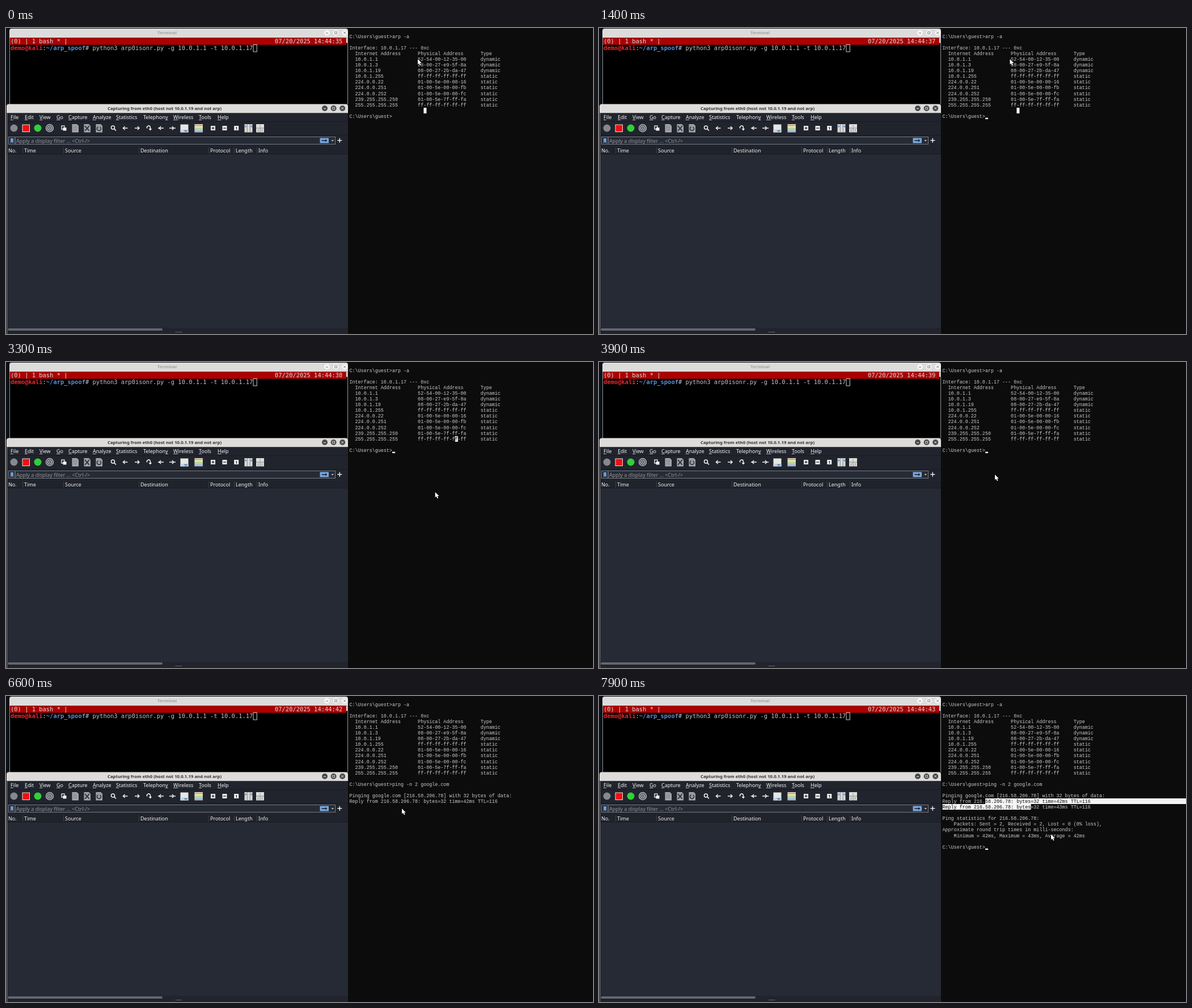
Animation, 1035 px wide and 541 px high, one loop 8000 ms. Source, as an HTML page with a canvas:

```html
<!DOCTYPE html>
<html lang="en">
<head>
<meta charset="utf-8">
<title>Desktop capture</title>
<style>
html, body { margin: 0; width: 100%; height: 100%; overflow: hidden; background: #0c0c0c; }
canvas { display: block; }
</style>
</head>
<body>
<canvas id="stage" width="1035" height="541"></canvas>
<script>
const W = 1035, H = 541, LOOP = 8000, STEP = 100;
const g = document.getElementById('stage').getContext('2d');
const UI = '9.1px "Noto Sans", sans-serif';
const LABEL = '500 9px "Noto Sans", sans-serif';
const TITLE = 'bold 7.75px "Noto Sans", sans-serif';
const TERM = '10.44px "DejaVu Sans Mono", monospace';
const CMD = '8.39px "Liberation Mono", monospace';

function box(x, y, w, h, color) {
  g.fillStyle = color;
  g.fillRect(x, y, w, h);
}
function frame(x, y, w, h, color, lw = 1) {
  g.strokeStyle = color;
  g.lineWidth = lw;
  g.strokeRect(x, y, w, h);
}
function disc(x, y, r, color) {
  g.fillStyle = color;
  g.beginPath();
  g.arc(x, y, r, 0, 7);
  g.fill();
}
function ring(x, y, r, color, lw, from = 0, to = 7) {
  g.strokeStyle = color;
  g.lineWidth = lw;
  g.beginPath();
  g.arc(x, y, r, from, to);
  g.stroke();
}
function line(color, lw, ...p) {
  g.strokeStyle = color;
  g.lineWidth = lw;
  g.beginPath();
  for (let i = 0; i < p.length; i += 2) g.lineTo(p[i], p[i + 1]);
  g.stroke();
}
function poly(color, ...p) {
  g.fillStyle = color;
  g.beginPath();
  for (let i = 0; i < p.length; i += 2) g.lineTo(p[i], p[i + 1]);
  g.fill();
}
function text(s, x, y, font, color) {
  g.font = font;
  g.fillStyle = color;
  g.fillText(s, x, y);
}
function titleBar(x, y, w, h, color) {
  g.fillStyle = color;
  g.beginPath();
  g.roundRect(x, y, w, h, [4, 4, 0, 0]);
  g.fill();
}
function windowButtons(x, y, fill, ink) {
  for (let i = 0; i < 3; i++) disc(x + i * 15.6, y, 5, fill);
  line(ink, 1, x - 2, y + .5, x + 2, y + .5);
  frame(x + 13.8, y - 1.8, 3.6, 3.6, ink, .9);
  const c = x + 31.2;
  line(ink, 1, c - 1.8, y - 1.8, c + 1.8, y + 1.8);
  line(ink, 1, c - 1.8, y + 1.8, c + 1.8, y - 1.8);
}

// Terminal window
const EDGE = '#8f949a';

function drawTerminal(seconds) {
  box(0, 0, 603, 135, '#0b1016');
  titleBar(6, 1, 597, 17, '#dedcda');
  text('Terminal', 267, 11, TITLE, '#a3a19f');
  windowButtons(566, 8.5, '#f6f5f4', '#77767b');
  box(6, 17.4, 597, 117.6, EDGE);
  box(7, 17.4, 595, 117.6, '#000');
  box(7, 17.4, 593, 12.3, '#ad0000');
  box(600, 17.4, 2, 9, '#e4e4e4');
  text('(0) | 1 bash * |', 8, 27.2, TERM, '#dcdcdc');
  text('07/20/2025 14:44:' + seconds, 474, 27.2, TERM, '#dcdcdc');
  let x = 8;
  const put = (s, color, bold) => {
    text(s, x, 39.2, (bold ? 'bold ' : '') + TERM, color);
    x += g.measureText(s).width;
  };
  put('demo@kali', '#f0282e', true);
  put(':', '#d0d0d0');
  put('~/arp_spoof', '#5b8fd6', true);
  put('# python3 arp0isonr.py -g 10.0.1.1 -t 10.0.1.17', '#c4c4c4');
  frame(436, 29.5, 6.3, 12.5, '#d0d0d0');
}

// Toolbar icons, all centred on one row
const ROW = 177, INK = '#f2f2f2', BLUE = '#5d93cf';

function page(x) {
  poly('#a6a9ae', x - 5.5, ROW - 7, x + 3, ROW - 7, x + 6, ROW - 4, x + 6, ROW + 7.5, x - 5.5, ROW + 7.5);
  for (let y = -4; y <= 5; y += 2.5) line('#6d7179', .8, x - 4, ROW + y, x + 4, ROW + y);
}
function arrow(x, dir) {
  line(INK, 1.5, x - 4 * dir, ROW, x + 4 * dir, ROW);
  line(INK, 1.5, x + .8 * dir, ROW - 3, x + 4 * dir, ROW, x + .8 * dir, ROW + 3);
}
function badge(x, sign) {
  box(x - 4, ROW - 4, 8, 8, INK);
  if (sign === '1') text('1', x - 1.9, ROW + 2.8, 'bold 7px "Noto Sans", sans-serif', '#20232b');
  else line('#20232b', 1.3, x - 2.5, ROW, x + 2.5, ROW);
  if (sign === '+') line('#20232b', 1.3, x, ROW - 2.5, x, ROW + 2.5);
}
function drawToolbar() {
  disc(14, ROW, 6.5, '#85888d');
  box(28.5, 170.5, 13.5, 13.5, '#f5d8d8');
  box(29.5, 171.5, 11.5, 11.5, '#ee1111');
  disc(56, ROW, 6.5, '#2fd03a');

  disc(77, ROW, 7.2, '#b4b7bb');
  for (const r of [2, 5]) ring(77, ROW, r, '#3b3f49', 1.3);

  frame(98, 173, 5, 6, INK, 1.3);
  box(100.5, 176, 6, 5.5, INK);
  page(122);
  page(143);
  line('#23262f', 1.5, 139, 173, 147, 182);
  line('#23262f', 1.5, 147, 173, 139, 182);
  page(164);
  ring(164, 178, 3.6, '#23262f', 1.4, -1, 4.2);

  ring(188.5, 176, 3, INK, 1.5);
  line(INK, 1.7, 190.6, 178.2, 194, 181.5);
  arrow(210.5, -1);
  arrow(231, 1);
  ring(251.5, 176, 3, INK, 1.5, Math.PI * .85, Math.PI * 2);
  line(INK, 1.5, 254.5, 176, 254.5, 180);
  poly(INK, 251.5, 178, 257.2, 178, 254.5, 181.5);
  arrow(274, -1);
  disc(269, ROW, 1, INK);
  arrow(292, 1);
  disc(298, ROW, 1, INK);

  box(307.5, 170.5, 14, 14, '#e6e6e3');
  box(307.5, 180, 14, 4.5, '#cdd2d8');
  poly(BLUE, 313, 180.5, 321, 180.5, 317, 184.5);
  box(332.5, 170, 14.5, 14.5, '#eceae0');
  ['#d9534f', '#dfd05a', '#7dbf5d', '#5d93cf', '#9a6fb8'].forEach((c, i) => box(332.5, 171.5 + i * 2.8, 14.5, 1.2, c));
  badge(365, '+');
  badge(385.5, '-');
  badge(406.2, '1');
  box(420.5, 170, 14, 14.5, '#d9d9d6');
  line('#6c7078', .8, 425.3, 170, 425.3, 184.5);
  line('#6c7078', .8, 430.2, 170, 430.2, 184.5);
  poly(BLUE, 421.5, 172, 425, 174, 421.5, 176);
  poly(BLUE, 434, 172, 430.5, 174, 434, 176);
  box(441, 170, 14, 14.5, '#dededb');
  line('#6c7078', .8, 441, ROW, 455, ROW);
  line('#6c7078', .8, 448, ROW, 448, 184.5);
  const tiny = '5px "Noto Sans", sans-serif';
  text('1', 446.6, 175.5, tiny, '#555');
  text('2', 443, 183, tiny, '#555');
  text('3', 450, 183, tiny, '#555');
}

// Packet capture window
const MENU = [['File', 8], ['Edit', 33], ['View', 59], ['Go', 89], ['Capture', 110], ['Analyze', 153],
  ['Statistics', 194], ['Telephony', 242, 8], ['Wireless', 295], ['Tools', 340], ['Help', 373]];
const COLUMNS = [['No.', 4], ['Time', 32], ['Source', 104], ['Destination', 237],
  ['Protocol', 360], ['Length', 405], ['Info', 445]];

function drawCapture() {
  titleBar(1, 134.5, 602, 20, '#dedcda');
  text('Capturing from eth0 (host not 10.0.1.19 and not arp)', 179, 144.7, TITLE, '#303030');
  windowButtons(562, 142, '#4b4b4b', '#e4e4e4');
  box(0, 150.5, 603, 390.5, '#0b1016');
  box(1, 150.5, 1, 390.5, EDGE);
  box(2, 150.5, 601, 390.5, '#21242d');

  for (const [name, x, key = 0] of MENU) {
    text(name, x, 160.6, LABEL, '#f5f5f5');
    const left = x + g.measureText(name.slice(0, key)).width;
    box(left, 162, g.measureText(name[key]).width, .8, '#e0e0e0');
  }
  box(2, 165, 601, 1, '#191b22');
  drawToolbar();
  box(2, 189.5, 601, 1, '#191b22');

  box(5, 193, 575, 12.5, '#272b35');
  frame(4.5, 192.5, 576, 13, '#777b84');
  poly('#6b9bd2', 8, 195, 13, 195, 13, 204, 10.5, 201.5, 8, 204);
  box(15.5, 193.5, 1, 11.5, '#9a9da4');
  text('Apply a display filter ... <Ctrl-/>', 18, 202.6, UI, '#92959c');
  box(553.5, 194.5, 15.5, 9, '#79a8de');
  line('#1d2330', 1.6, 556.5, 199, 564, 199);
  poly('#1d2330', 563, 196.5, 566.5, 199, 563, 201.5);
  poly('#c8c8c8', 573.5, 198, 578, 198, 575.8, 200.5);
  line(INK, 1.4, 584.3, 198.7, 592.3, 198.7);
  line(INK, 1.4, 588.3, 194.7, 588.3, 202.7);

  box(2, 210, 601, 13, '#20232b');
  for (const [name, x] of COLUMNS) {
    text(name, x, 219.6, LABEL, '#f2f2f2');
    if (x > 4) box(x - 3, 211, 1, 11.5, '#3a3e48');
  }
  box(2, 223, 601, 307.5, '#262a34');
  box(2, 222.5, 601, .8, '#171920');
  box(2, 530.5, 601, 10.5, '#21242d');
  g.fillStyle = '#64676e';
  g.beginPath();
  g.roundRect(3, 531, 273, 4, 2);
  g.fill();
  for (let i = 0; i < 6; i++) box(299 + i * 2, 537, 1, 1, '#a0a3a8');
}

// Command prompt on the right
const CW = 5.035, RH = 10.08, X0 = 605.5, Y0 = 9.9;
const colX = c => X0 + c * CW;
const rowY = r => Y0 + r * RH;
const PROMPT = 'C:\\Users\\guest>';
const HOST = '216.58.206.78';
const ARP = `10.0.1.1 52-54-00-12-35-00 dynamic
10.0.1.3 08-00-27-e9-5f-8a dynamic
10.0.1.19 08-00-27-2b-da-47 dynamic
10.0.1.255 ff-ff-ff-ff-ff-ff static
224.0.0.22 01-00-5e-00-00-16 static
224.0.0.251 01-00-5e-00-00-fb static
224.0.0.252 01-00-5e-00-00-fc static
239.255.255.250 01-00-5e-7f-ff-fa static
255.255.255.255 ff-ff-ff-ff-ff-ff static`.split('\n').map(s => {
  const [ip, mac, kind] = s.split(' ');
  return '  ' + ip.padEnd(22) + mac.padEnd(22) + kind;
});

function cmdLines(t) {
  const out = [PROMPT + 'arp -a', '', 'Interface: 10.0.1.17 --- 0xc',
    '  Internet Address      Physical Address      Type', ...ARP, '',
    PROMPT + (t >= 5000 ? 'ping -n 2 google.com' : '')];
  if (t >= 5700) out.push('', `Pinging google.com [${HOST}] with 32 bytes of data:`);
  if (t >= 5800) out.push(`Reply from ${HOST}: bytes=32 time=42ms TTL=116`);
  if (t >= 6900) out.push(`Reply from ${HOST}: bytes=32 time=43ms TTL=116`, '',
    `Ping statistics for ${HOST}:`,
    '    Packets: Sent = 2, Received = 2, Lost = 0 (0% loss),',
    'Approximate round trip times in milli-seconds:',
    '    Minimum = 42ms, Maximum = 43ms, Average = 42ms', '', PROMPT);
  return out;
}

// Spans of selected cells: [row, first column, end column]
function selection(t, m) {
  const col = Math.floor((m.x - X0) / CW) + 1;
  if (t < 1500) return [[13, 26, 27]];
  if (t < 3100) return [[4, 23, t < 2100 ? Math.max(24, col) : 43]];
  if (t < 3900) return [[12, 37, 38]];
  if (t < 7300) return [];
  if (t >= 7600) return [[17, 15, 90], [18, 0, 31]];
  return m.y < rowY(18) ? [[17, 15, Math.max(16, col)]] : [[17, 15, 90], [18, 0, col]];
}

// Caret toggles at each of these times
const BLINKS = [100, 600, 1200, 2300, 2700, 3400, 3900, 4400, 4900, 5500, 5900, 6500, 6900];
const caretOn = t => BLINKS.filter(b => b <= t).length % 2 === 1;

function drawLines(lines, color) {
  lines.forEach((s, r) => text(s, X0, rowY(r) + 7.8, CMD, color));
}
function drawCmd(t, m) {
  box(603, 0, W - 603, H, '#0c0c0c');
  const lines = cmdLines(t);
  drawLines(lines, '#cccccc');
  for (const [r, a, b] of selection(t, m)) {
    const top = Math.round(rowY(r));
    g.save();
    g.beginPath();
    g.rect(colX(a), top, (b - a) * CW, Math.round(rowY(r + 1)) - top);
    g.clip();
    box(603, 0, W - 603, H, '#f4f4f4');
    drawLines(lines, '#0c0c0c');
    g.restore();
  }
  if (caretOn(t)) {
    const waiting = t >= 5800 && t < 6900;
    const row = waiting ? 18 : lines.length - 1;
    const col = waiting ? 0 : lines[row].length;
    box(colX(col), rowY(row) + 7.7, CW, 2.4, '#f2f2f2');
  }
}

// Mouse pointer: [time, x, y]
const PATH = [[200, 726, 55], [600, 768, 56], [1000, 730, 56], [1400, 724.5, 55], [1500, 724.5, 55],
  [2000, 812, 55], [2200, 816, 55], [2400, 815, 55], [2900, 815, 55.5], [3100, 794, 132],
  [3300, 756.7, 230], [3800, 698, 199], [7000, 698, 199], [7300, 683, 184], [7600, 760, 194], [7900, 797, 244.5]];

function pointer(t) {
  const i = PATH.findIndex(p => p[0] > t);
  const b = PATH[i < 0 ? PATH.length - 1 : i];
  const a = PATH[i < 0 ? PATH.length - 1 : Math.max(0, i - 1)];
  let k = b === a ? 0 : (t - a[0]) / (b[0] - a[0]);
  k = k * k * (3 - 2 * k);
  return { x: a[1] + (b[1] - a[1]) * k, y: a[2] + (b[2] - a[2]) * k };
}
function drawPointer({ x, y }) {
  g.save();
  g.translate(x, y);
  g.beginPath();
  for (const [px, py] of [[0, 0], [0, 9.6], [2.2, 7.6], [3.9, 11.3], [5.6, 10.5], [4, 7], [7, 7]]) g.lineTo(px, py);
  g.closePath();
  g.strokeStyle = '#000';
  g.lineWidth = 1.2;
  g.stroke();
  g.fillStyle = '#fff';
  g.fill();
  g.restore();
}

const start = performance.now();
function tick() {
  const now = (performance.now() - start) % LOOP;
  const t = Math.floor(now / STEP) * STEP;
  const mouse = pointer(t);
  g.clearRect(0, 0, W, H);
  drawTerminal(35 + Math.floor((t + 650) / 1015));
  drawCapture();
  drawCmd(t, mouse);
  drawPointer(mouse);
  requestAnimationFrame(tick);
}
tick();
</script>
</body>
</html>
```
